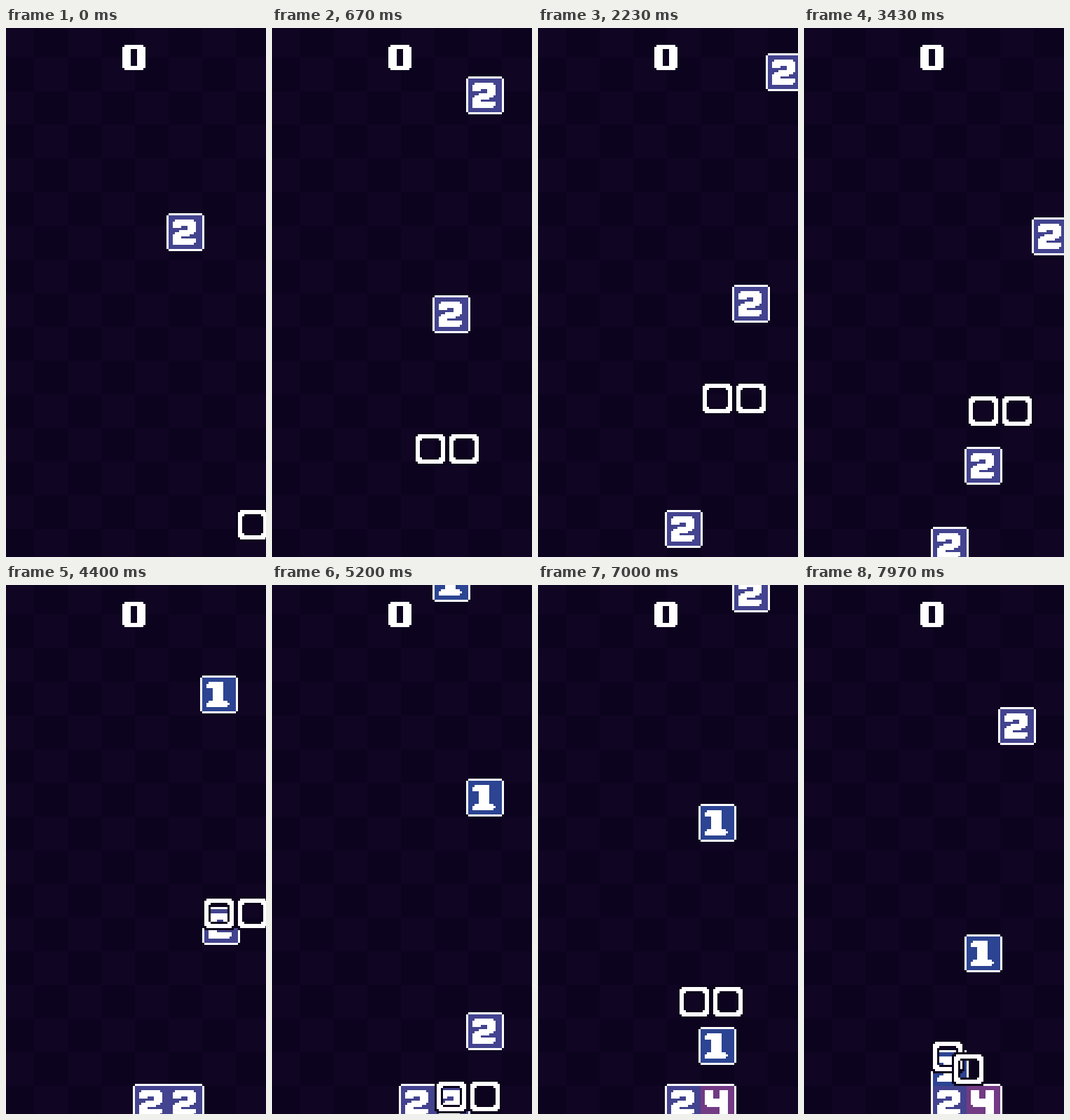
Recreate the animation shown at these times as an HTML page with a canvas. Size 371 px wide and 754 px high, loop 8 s.

```html
<!DOCTYPE html>
<html lang="en">
<head>
<meta charset="utf-8">
<title>Falling number tiles</title>
<style>
  html, body { margin: 0; width: 100%; height: 100%; overflow: hidden; background: #0d041c; }
  canvas { display: block; }
</style>
</head>
<body>
<canvas id="stage" width="371" height="754"></canvas>
<script>
const ctx = document.getElementById('stage').getContext('2d');
const LOOP = 8000, PX = 3, CELL = 48;
const LAG = 88;      // easing time of every move
const STEP = 252;    // a tile drops one row per step
const SPAWN = 1685;  // a new tile appears each period
const REPEAT = 110;  // pace of cursor moves within a burst
const MERGE = 5900, SHAKE_END = 6200;
const WHITE = '#fff', OUTLINE = '#0d041c', DARK = '#0c041f', LIGHT = '#100523';
const COLORS = { 1: '#2c4492', 2: '#43438f', 4: '#723b84' };

const rows = (n, row) => Array(n).fill(row);
const GLYPHS = {
  0: ['.#########.', '###########', ...rows(8, '####...####'), '###########', '.#########.'],
  1: ['.#######...', ...rows(2, '########...'), ...rows(6, '...#####...'),
      '.#########.', '###########', '##########.'],
  2: ['.#########.', ...rows(2, '###########'), '####...####', '.......####', '...########',
      '.#########.', '########...', '####.......', ...rows(2, '###########'), '##########.'],
  4: [...rows(4, '####...####'), ...rows(3, '###########'), '.##########', ...rows(4, '.......####')]
};

const snap = v => Math.round(v / PX) * PX;

// Follows a list of [time, target] keys, closing in exponentially on each one.
function follow(keys, t) {
  let v = keys[0][1];
  keys.forEach(([start, target], i) => {
    if (t < start) return;
    const end = i + 1 < keys.length ? Math.min(t, keys[i + 1][0]) : t;
    v = target + (v - target) * Math.exp((start - end) / LAG);
  });
  return v;
}

// Turns bursts of moves such as [time, 'LUD'] into keys for column and row.
function walk(col, row, bursts) {
  const x = [[-LOOP, col]], y = [[-LOOP, row]];
  for (const [start, moves] of bursts)
    [...moves].forEach((move, i) => {
      const t = start + i * REPEAT;
      if ('LR'.includes(move)) x.push([t, col += move === 'L' ? -1 : 1]);
      else y.push([t, row += move === 'U' ? -1 : 1]);
    });
  return { x, y };
}

const place = (path, t, dx, dy) => ({
  x: snap(follow(path.x, t) * CELL - dx - 1) + 1,
  y: snap(follow(path.y, t) * CELL - dy)
});

const tiles = [
  { value: 2, col: 5, slides: [1100] },
  { value: 2, col: 6, slides: [3120], merged: 4 },
  { value: 2, col: 7, slides: [4145, 5840], merged: 0 },
  { value: 1, col: 6, slides: [6650, 7560], floor: 14 },
  { value: 1, col: 5, slides: [] },
  { value: 2, col: 6, slides: [] }
].map(({ value, merged = value, col, slides, floor = 15 }, i) => {
  const birth = (i - 1) * SPAWN - 30;
  const path = walk(col, -1, slides.map(t => [t, 'L']));
  for (let row = -1; row <= floor; row++) path.y.push([birth + 98 + (row - 0) * STEP, row]);
  return { value, merged, path };
});

const moves = [[-41, 'D'], [33, 'ULULULUU'], [1255, 'R'], [1255, 'D'], [1700, 'U'], [2140, 'D'],
  [3600, 'RUU'], [4357, 'DDLDDDD'], [6250, 'UUU'], [6900, 'LDD'], [7660, 'L'], [7767, 'R']];
const TURN = 7932;   // the pair rotates upright
const cursors = [
  walk(7, 14, [...moves, [TURN, 'U']]),
  walk(8, 14, [...moves, [TURN, 'L']])
];

let tilt = 0, lift = 0;

function box(x, y, w, h, color) {
  ctx.fillStyle = color;
  ctx.fillRect(x - snap(tilt * y), y - lift, w, h);
}

function glyph(digit, x, y) {
  GLYPHS[digit].forEach((row, r) => {
    for (const run of row.matchAll(/#+/g))
      box(x + run.index * PX, y + r * PX, run[0].length * PX, PX, WHITE);
  });
}

function ring(x, y, w, h, thick, color) {
  for (const dy of [0, h - thick]) box(x + PX, y + dy, w - 2 * PX, thick, color);
  for (const dx of [0, w - thick]) box(x + dx, y + PX, thick, h - 2 * PX, color);
}

function cursor({ x, y }) {
  ring(x - PX, y - PX, 48, 48, 12, OUTLINE);
  ring(x, y, 42, 42, 6, WHITE);
  for (const dx of [6, 33])
    for (const dy of [6, 33]) box(x + dx, y + dy, PX, PX, WHITE);
}

function background() {
  ctx.fillStyle = DARK;
  ctx.fillRect(0, 0, 371, 754);
  for (let r = 0; r < 17; r++)
    for (let c = r % 2; c < 9; c += 2)
      box(c * CELL - 8, r * CELL - 6, CELL, CELL, LIGHT);
}

function draw(t) {
  const shaking = t > MERGE && t < SHAKE_END;
  const swing = shaking ? Math.cos((t - 6030) / 45) : 0;
  tilt = 0.005 * swing;
  lift = snap(3 * swing);
  background();

  const shown = tiles
    .map(p => ({ value: t < MERGE ? p.value : p.merged, ...place(p.path, t, 11, 9) }))
    .filter(p => p.value);
  for (const { x, y } of shown) {
    box(x + PX, y, 48, 54, WHITE);
    box(x, y + PX, 54, 48, WHITE);
  }
  for (const { x, y, value } of shown) {
    box(x + PX, y + PX, CELL, CELL, COLORS[value]);
    glyph(value, x + 9, y + 9);
  }

  for (const path of cursors) cursor(place(path, t, 5, 3));
  if (shaking) ring(295, 732, 12, 15, PX, WHITE);
  glyph(0, 166, 24);
}

function frame() {
  draw(performance.now() % LOOP);
  requestAnimationFrame(frame);
}
draw(0);
requestAnimationFrame(frame);
</script>
</body>
</html>
```
